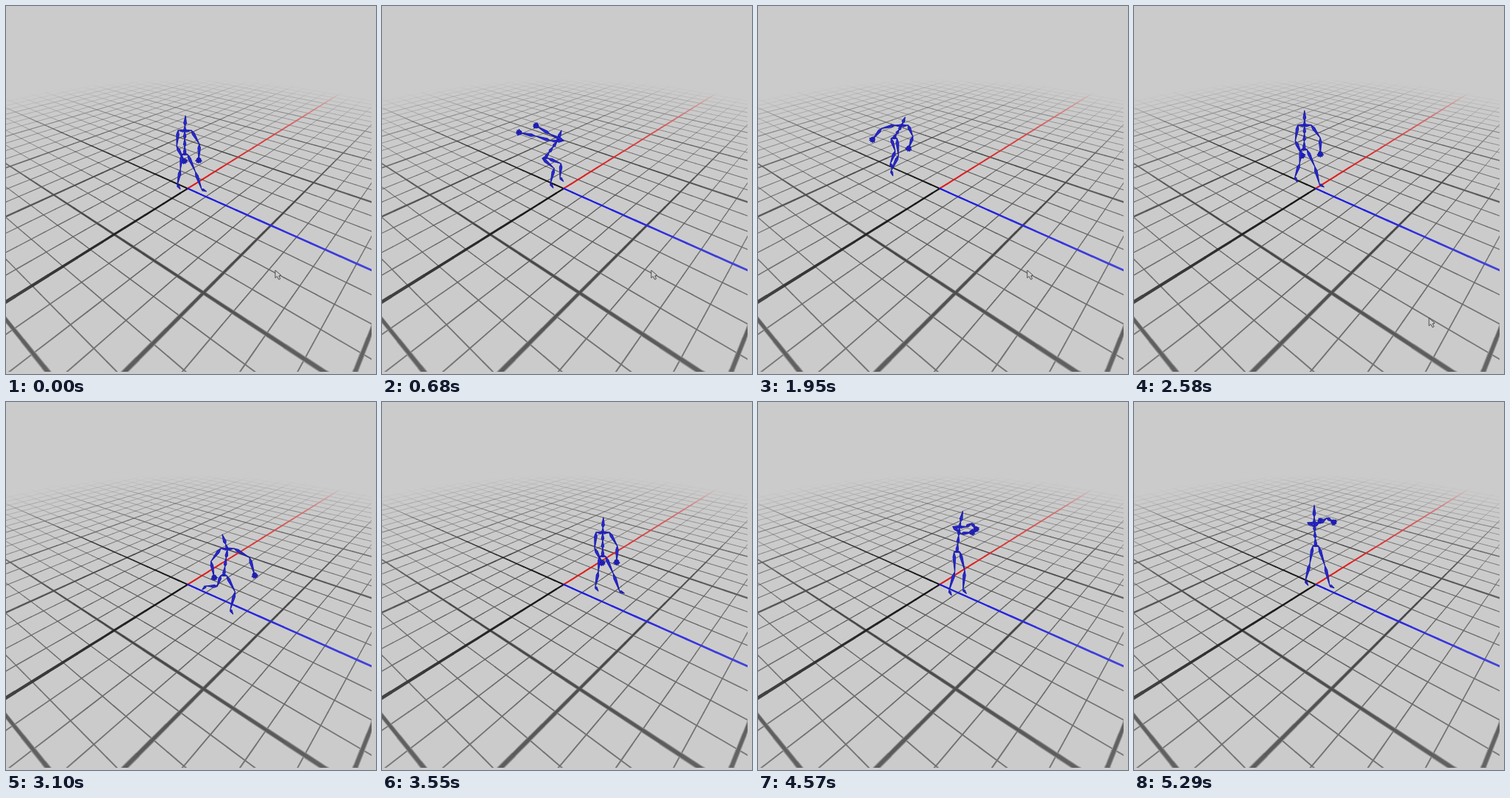
Animation of 503 by 500 pixels, one loop 5390 ms. Source, as an HTML page with a canvas:

```html
<!DOCTYPE html>
<html lang="en">
<head>
<meta charset="utf-8">
<title>Backflip rig</title>
<style>
html, body { margin: 0; width: 100%; height: 100%; overflow: hidden; background: #cbcbcb; }
canvas { display: block; }
</style>
</head>
<body>
<canvas id="stage" width="503" height="500"></canvas>
<script>
const W = 503, H = 500, VIEW = 497, LOOP = 5390, STEP = 90.8, FRAMES = 59;
const stage = document.getElementById('stage');
const ctx = stage.getContext('2d');

// ---------- ground plane ----------
// Perspective from the origin on screen and the two vanishing points.
const ORIGIN = [247, 248], HORIZON = -22;
const U = { vanish: 680, rate: 0.1876 }, V = { vanish: -361, rate: -0.1567 };
const depth = (u, v) => 1 + U.rate * u + V.rate * v;
function project(u, v) {
  const d = depth(u, v);
  return [
    (ORIGIN[0] + U.vanish * U.rate * u + V.vanish * V.rate * v) / d,
    HORIZON + (ORIGIN[1] - HORIZON) / d
  ];
}

const BG = [203, 203, 203];
const mix = (c, a) => 'rgb(' + c.map((n, i) => Math.round(BG[i] + (n - BG[i]) * a)).join(',') + ')';

function gridLine(g, at, color, weight, power, from, to) {
  const step = 0.125;
  for (let s = from; s < to; s += step) {
    const [u0, v0] = at(s), [u1, v1] = at(s + step);
    const r = Math.hypot(u0 + u1, v0 + v1) / 2;
    if (r > 5 || depth(u0, v0) < 0.4 || depth(u1, v1) < 0.4) continue;
    const p = project(u0, v0), q = project(u1, v1);
    const len = Math.hypot(q[0] - p[0], q[1] - p[1]) || 1;
    const ex = (q[0] - p[0]) / len * 0.4, ey = (q[1] - p[1]) / len * 0.4;
    g.strokeStyle = mix(color, 1 - Math.pow(r / 5, 1.4));
    g.lineWidth = Math.max(0.5, weight / Math.pow(depth((u0 + u1) / 2, (v0 + v1) / 2), power));
    g.beginPath();
    g.moveTo(p[0] - ex, p[1] - ey);
    g.lineTo(q[0] + ex, q[1] + ey);
    g.stroke();
  }
}

function makeGround() {
  const c = document.createElement('canvas');
  c.width = W;
  c.height = H;
  const g = c.getContext('2d');
  g.fillStyle = mix(BG, 1);
  g.fillRect(0, 0, W, H);
  g.beginPath();
  g.rect(0, 0, VIEW, VIEW);
  g.clip();
  const alongU = k => s => [s, k], alongV = k => s => [k, s];
  const both = (k, color, weight, power, from = -5, to = 5) => {
    gridLine(g, alongU(k), color, weight, power, from, to);
    gridLine(g, alongV(k), color, weight, power, from, to);
  };
  for (let i = -20; i <= 20; i++) if (i % 4) both(i / 4, [84, 84, 84], 1.1, 0.9);
  // Wide pale pass first, then the dark core, for soft edges.
  for (const [tone, weight] of [[118, 2.3], [52, 1.5]]) {
    for (let i = -5; i <= 5; i++) if (i) both(i, [tone, tone, tone], weight, 1.9);
  }
  both(0, [18, 18, 18], 2.1, 1.7, -5, 0);
  gridLine(g, alongU(0), [222, 24, 24], 2.1, 0.5, 0, 5);
  gridLine(g, alongV(0), [24, 24, 222], 2.2, 0.8, 0, 5);
  return c;
}
const ground = makeGround();

// ---------- figure ----------
// A pose lists pelvis, neck and head, the ends of the limbs, and how far
// elbows and knees bow out.
const STAND = {
  pelvis: [243, 201], neck: [243, 170], head: [244, 149],
  hands: [[242, 210], [262, 209]], ankles: [[233, 243], [266, 249]], elbow: 6, knee: 1
};
const CROUCH = {
  pelvis: [222, 206], neck: [238, 184], head: [244, 169],
  hands: [[187, 172], [210, 163]], ankles: [[229, 241], [242, 233]], elbow: 1, knee: 11
};
const FLIP = {
  pelvis: [206, 95], neck: [181, 118], head: [186, 130],
  hands: [[163, 89], [210, 73]], ankles: [[198, 48], [215, 54]], elbow: -4, knee: 17
};
const LAND = {
  pelvis: [185, 179], neck: [195, 163], head: [200, 151],
  hands: [[156, 181], [205, 193]], ankles: [[180, 214], [181, 224]], elbow: 6, knee: 6
};
const LUNGE = {
  pelvis: [296, 235], neck: [301, 200], head: [294, 180],
  hands: [[283, 238], [338, 235]], ankles: [[272, 250], [305, 282]], elbow: 9, knee: 9
};
const PUNCH = {
  pelvis: [288, 209], neck: [296, 175], head: [303, 156],
  hands: [[317, 191], [315, 179]], ankles: [[278, 268], [289, 258]], elbow: 6, knee: 7
};
const GUARD = {
  ...STAND, pelvis: [247, 195], neck: [245, 165], head: [245, 140],
  hands: [[253, 162], [271, 163]]
};

const add = (p, q) => [p[0] + q[0], p[1] + q[1]];
const sub = (p, q) => [p[0] - q[0], p[1] - q[1]];
const mid = (p, q, f) => [p[0] + (q[0] - p[0]) * f, p[1] + (q[1] - p[1]) * f];
const num = (a, b, f) => a + (b - a) * f;
const turn = (p, a) => [
  p[0] * Math.cos(a) + p[1] * Math.sin(a),
  p[1] * Math.cos(a) - p[0] * Math.sin(a)
];

// Keys keep every point in the body's own turned space, so a flip stays rigid.
const keys = [];
function key(frame, pose, pelvis = pose.pelvis) {
  const up = sub(pose.neck, pose.pelvis);
  let lean = Math.atan2(-up[0], -up[1]);
  const last = keys[keys.length - 1];
  while (last && lean < last.lean - Math.PI / 2) lean += 2 * Math.PI;
  const local = p => turn(sub(p, pose.pelvis), -lean);
  const points = [pose.neck, pose.head, ...pose.hands, ...pose.ankles].map(local);
  keys.push({ frame, lean, pelvis, points, elbow: pose.elbow, knee: pose.knee });
}
key(0, STAND);
key(7, CROUCH);
key(13, FLIP);
key(21, LAND);
key(27, STAND, [222, 189]);
key(34, LUNGE);
key(39, STAND, [300, 209]);
key(44, PUNCH);
key(58, GUARD);
key(FRAMES, STAND);

function spline(a, b, c, d, f) {
  return b + 0.5 * f * (c - a + f * (2 * a - 5 * b + 4 * c - d + f * (3 * (b - c) + d - a)));
}

function poseAt(frame) {
  let i = 0;
  while (i < keys.length - 2 && keys[i + 1].frame <= frame) i++;
  const a = keys[i], b = keys[i + 1];
  const before = keys[Math.max(0, i - 1)], after = keys[Math.min(keys.length - 1, i + 2)];
  const f = (frame - a.frame) / (b.frame - a.frame);
  const pelvis = [0, 1].map(k => spline(before.pelvis[k], a.pelvis[k], b.pelvis[k], after.pelvis[k], f));
  const lean = num(a.lean, b.lean, f);
  const place = (p, n) => add(pelvis, turn(mid(p, b.points[n], f), lean));
  const [neck, head, handL, handR, ankleL, ankleR] = a.points.map(place);
  return {
    pelvis, neck, head, hands: [handL, handR], ankles: [ankleL, ankleR],
    elbow: num(a.elbow, b.elbow, f), knee: num(a.knee, b.knee, f)
  };
}

function bone(p, q, w) {
  const [dx, dy] = sub(q, p), len = Math.hypot(dx, dy);
  if (len < 0.5) return;
  const side = [-dy / len * w, dx / len * w], wide = mid(p, q, 0.25);
  ctx.beginPath();
  [p, add(wide, side), q, sub(wide, side)].forEach(c => ctx.lineTo(c[0], c[1]));
  ctx.closePath();
  ctx.fill();
  ctx.stroke();
}

// Two bones whose middle joint bows out sideways; returns that joint.
function limb(p, q, bow) {
  const [dx, dy] = sub(q, p), len = Math.hypot(dx, dy) || 1;
  const joint = add(mid(p, q, 0.5), [dy / len * bow, -dx / len * bow]);
  bone(p, joint, 1.7);
  bone(joint, q, 1.7);
  return joint;
}

function hand(elbow, wrist) {
  const base = Math.atan2(wrist[1] - elbow[1], wrist[0] - elbow[0]);
  for (let i = -2; i <= 2; i++) {
    const a = base + i * 0.6;
    const at = r => add(wrist, [Math.cos(a) * r, Math.sin(a) * r]);
    bone(at(-3), at(1.5), 1.4);
    bone(at(1), at(4.5), 1.4);
  }
}

function foot(knee, ankle) {
  const [dx, dy] = sub(ankle, knee), len = Math.hypot(dx, dy) || 1;
  bone(ankle, add(ankle, [(dx + dy) / len * 5, (dy - dx) / len * 5]), 1.4);
}

function drawFigure(pose) {
  ctx.fillStyle = '#2a2ad6';
  ctx.strokeStyle = '#1f1fae';
  ctx.lineWidth = 1.2;
  ctx.lineJoin = 'round';
  const { pelvis, neck, head } = pose;
  for (let i = 0; i < 3; i++) bone(mid(pelvis, neck, i / 3), mid(pelvis, neck, (i + 1) / 3), 1.7);
  bone(neck, mid(neck, head, 0.35), 1.4);
  bone(mid(neck, head, 0.35), head, 1.8);
  [-1, 1].forEach((side, n) => {
    const shoulder = add(neck, [side * 9, -1]), hip = add(pelvis, [side * 4, 1]);
    bone(neck, shoulder, 1.5);
    hand(limb(shoulder, pose.hands[n], side * pose.elbow), pose.hands[n]);
    bone(pelvis, hip, 1.3);
    foot(limb(hip, pose.ankles[n], pose.knee), pose.ankles[n]);
  });
}

// The pointer rests, then slides off the bottom edge.
function drawCursor(frame) {
  if (frame > 30) return;
  const f = Math.max(0, (frame - 26) / 4);
  ctx.save();
  ctx.translate(num(366, 436, f), num(359, 489, f));
  ctx.fillStyle = '#d0d0d0';
  ctx.strokeStyle = '#4a4a4a';
  ctx.lineWidth = 1;
  const arrow = new Path2D('M0 0V10.5L2.5 8.3 4.8 12.6 6.8 11.6 5 7.6 8 7Z');
  ctx.fill(arrow);
  ctx.stroke(arrow);
  ctx.restore();
}

const start = performance.now();
function draw(now) {
  const t = Math.max(0, now - start) % LOOP;
  const frame = Math.min(FRAMES - 1, Math.floor(t / STEP));
  ctx.drawImage(ground, 0, 0);
  drawFigure(poseAt(frame));
  drawCursor(frame);
  requestAnimationFrame(draw);
}
draw(start);
</script>
</body>
</html>
```
